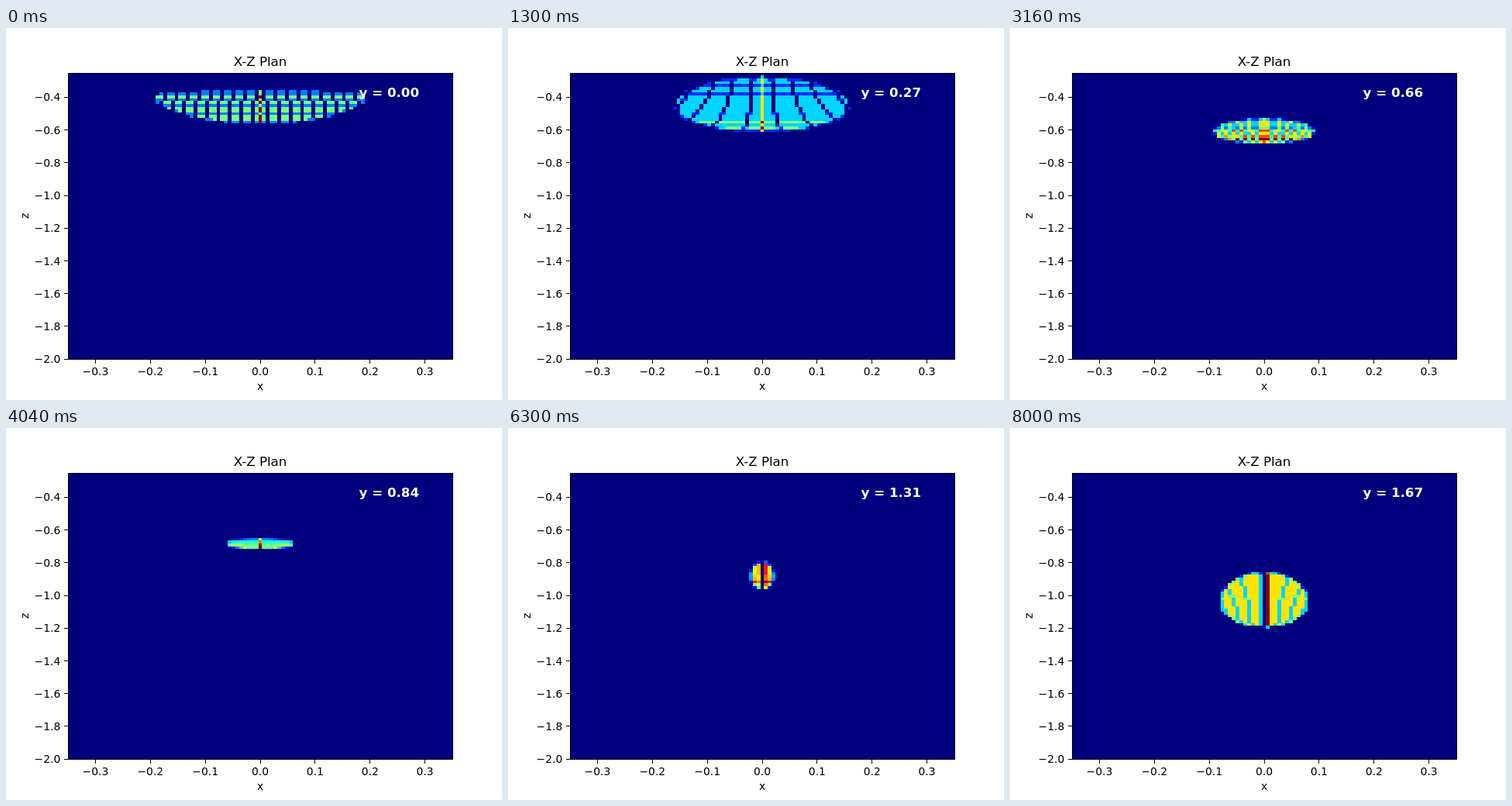
An HTML page with a canvas for the animation above (8.02 s loop, 640 by 480 pixels).

```html
<!DOCTYPE html>
<html>
<head>
<meta charset="utf-8">
<style>
html, body { margin: 0; width: 100%; height: 100%; overflow: hidden; background: #fff; }
canvas { display: block; }
</style>
</head>
<body>
<canvas id="plot" width="640" height="480"></canvas>
<script>
const g = document.getElementById('plot').getContext('2d');
const LEFT = 80, TOP = 57.6, WIDTH = 496, HEIGHT = 369.6;
const CELLS = 101, MID = 50, RAYS = 19;
const STEP = 20, LOOP = 8020;

const clamp = v => Math.max(0, Math.min(1, v));
const cellX = c => Math.round(LEFT + c * WIDTH / CELLS);
const cellY = r => Math.round(TOP + r * HEIGHT / CELLS);

function jet(v) {
  const red = v < .89 ? clamp((v - .35) / .31) : 1 - (v - .89) / .22;
  const green = v < .5 ? clamp((v - .125) / .25) : clamp((.91 - v) / .27);
  const blue = v < .2 ? clamp(.5 + v / .22) : clamp((.65 - v) / .31);
  return `rgb(${[red, green, blue].map(k => Math.floor(k * 255)).join()})`;
}

function label(text, x, y, size = 13.89, align = 'center', weight = 'normal') {
  g.font = `${weight} ${size}px "DejaVu Sans", sans-serif`;
  g.textAlign = align;
  g.fillText(text, x, y);
}

// Count where a square grid of rays, cut to a disc, meets the plane at time t.
function countRays(t) {
  const counts = new Map();
  const half = Math.abs(t - 5800) * .005;
  const upper = 28 + .0079 * (t - 4660);
  const lower = 28 + .0022 * (t - 4660);
  const bend = 1.8 * Math.max(0, 1 - t / 5500);

  for (let j = -RAYS; j <= RAYS; j++) {
    const v = j / RAYS;
    const z = (upper + lower) / 2 + (lower - upper) / 2 * v + bend * (1 - v * v);
    const row = Math.floor(z);
    if (row < 0) continue;
    for (let i = -RAYS; i <= RAYS; i++) {
      if (i * i + j * j > RAYS * RAYS) continue;
      const dist = half * Math.abs(i) / RAYS * (1 - .06 * v);
      const off = t < 5800 ? Math.round(dist) : Math.max(1, Math.ceil(dist - .05));
      if (z < 6.65 + (off / 27) ** 2 - .014 * t) continue;
      const key = row * CELLS + MID + (i < 0 ? -off : off);
      // The two halves of the beam share the central column.
      counts.set(key, (counts.get(key) || 0) + (i ? 1 : 2));
    }
  }
  return counts;
}

function drawField(t) {
  g.fillStyle = jet(0);
  g.fillRect(80, 58, 496, 369);
  const counts = countRays(t);
  const peak = Math.max(...counts.values());
  for (const [key, n] of counts) {
    const c = key % CELLS, r = Math.floor(key / CELLS);
    const x = cellX(c), y = cellY(r);
    g.fillStyle = jet(n / peak);
    g.fillRect(x, y, cellX(c + 1) - x, cellY(r + 1) - y);
  }
}

function drawAxes() {
  g.fillStyle = '#000';
  g.fillRect(80, 58, 497, 1);
  g.fillRect(80, 427, 497, 1);
  g.fillRect(80, 58, 1, 370);
  g.fillRect(576, 58, 1, 370);

  const number = v => v.toFixed(1).replace('-', '\u2212');
  for (let k = -3; k <= 3; k++) {
    const x = LEFT + (k / 10 + .35) / .7 * WIDTH;
    g.fillRect(Math.floor(x), 428, 1, 5);
    label(number(k / 10), x, 447.5);
  }
  for (let k = 2; k <= 10; k++) {
    const y = TOP + (k / 5 - .25) / 1.75 * HEIGHT;
    g.fillRect(75, Math.floor(y), 5, 1);
    label(number(-k / 5), 70.3, y + 5.2, 13.89, 'right');
  }

  label('X-Z Plan', 328, 49.3, 16.67);
  label('x', 328, 467);
  g.save();
  g.translate(28.5, 242.4);
  g.rotate(-Math.PI / 2);
  label('z', 0, 0);
  g.restore();
}

function draw(now) {
  const frame = Math.floor(now % LOOP / STEP);
  g.fillStyle = '#fff';
  g.fillRect(0, 0, 640, 480);
  drawField(frame * STEP);
  drawAxes();
  g.fillStyle = '#fff';
  label('y = ' + (frame * .004166).toFixed(2), 455.5, 89.3, 16.67, 'left', 'bold');
}

const start = performance.now();
function tick() {
  draw(performance.now() - start);
  requestAnimationFrame(tick);
}
tick();
</script>
</body>
</html>
```
